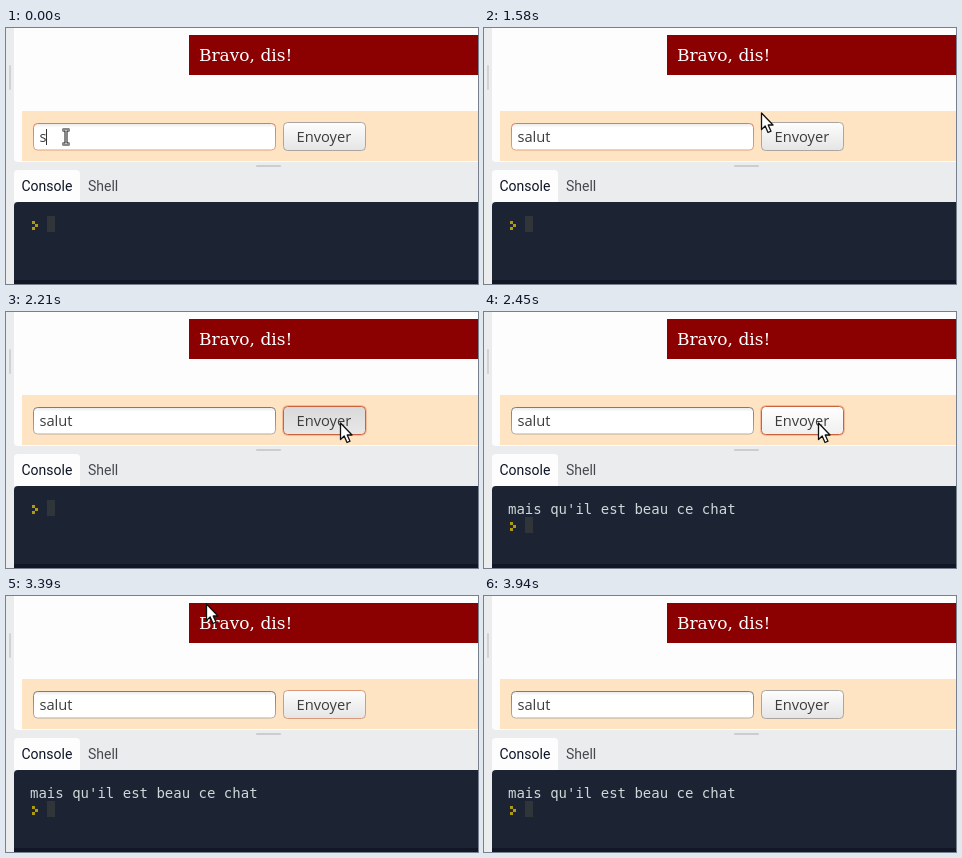
Animation, 472 px wide and 256 px high, one loop 4.12 s. Source, as an HTML page:

```html
<!DOCTYPE html>
<html lang="fr">
<head>
<meta charset="utf-8">
<title>Console</title>
<style>
html, body { margin: 0; width: 100%; height: 100%; overflow: hidden; background: #ebecee; }
svg { display: block; }
text { white-space: pre; }
.form { font: 14.7px "Open Sans", sans-serif; fill: #3c3c3c; }
.tab { font: 14px Roboto, sans-serif; }
</style>
</head>
<body>
<svg width="472" height="256" viewBox="0 0 472 256">
  <defs>
    <linearGradient id="normal" x2="0" y2="1"><stop stop-color="#fdfdfd"/><stop offset="1" stop-color="#e5e5e5"/></linearGradient>
    <linearGradient id="hover" x2="0" y2="1"><stop stop-color="#fff"/><stop offset="1" stop-color="#efefef"/></linearGradient>
    <linearGradient id="pressed" x2="0" y2="1"><stop stop-color="#d9d9d9"/><stop offset="1" stop-color="#e8e8e8"/></linearGradient>
    <linearGradient id="field" x2="0" y2="1"><stop stop-color="#e9e9e9"/><stop offset=".16" stop-color="#fff"/></linearGradient>
    <linearGradient id="grayEdge" x2="0" y2="1"><stop stop-color="#7f7b77"/><stop offset="1" stop-color="#b5aca3"/></linearGradient>
    <linearGradient id="orangeEdge" x2="0" y2="1"><stop stop-color="#d48059"/><stop offset="1" stop-color="#dfa17c"/></linearGradient>
  </defs>

  <rect width="472" height="256" fill="#ebecee"/>
  <rect x="3" y="37" width="2" height="25" rx="1" fill="#d0d2d5"/>
  <path d="M8 0H472V134H12Q8 134 8 130Z" fill="#fdfdfd"/>
  <rect x="183" y="7" width="289" height="40" fill="#8b0000"/>
  <text x="193" y="33" fill="#fff" style="font:17px 'DejaVu Serif',serif">Bravo, dis!</text>
  <rect x="16" y="83" width="456" height="50" fill="#ffe4c4"/>

  <rect id="input" x="27.5" y="95.5" width="242" height="26.5" rx="4" fill="url(#field)"/>
  <text id="typed" class="form" x="33.4" y="114"></text>
  <rect id="caret" y="101" width="1" height="16" fill="#333"/>
  <rect id="glow" x="276.5" y="93.5" width="84" height="30" rx="5" fill="none" stroke="#ef9a72" stroke-opacity=".55"/>
  <rect id="button" x="277.5" y="94.5" width="82" height="28" rx="4"/>
  <text class="form" x="290.5" y="114">Envoyer</text>

  <rect x="250" y="137" width="25" height="2" rx="1" fill="#cbcdd0"/>
  <path d="M8 174V146Q8 142 12 142H70Q74 142 74 146V174Z" fill="#fdfdfd"/>
  <text class="tab" x="15.5" y="163" fill="#0e1525">Console</text>
  <text class="tab" x="82" y="163" fill="#45494f">Shell</text>
  <path d="M8 256V178Q8 174 12 174H472V256Z" fill="#1c2333"/>
  <rect x="8" y="252" width="464" height="4" fill="#111726"/>
  <text id="output" x="24" y="202" fill="#cfd7d9" style="font:14px 'DejaVu Sans Mono',monospace">mais qu'il est beau ce chat</text>
  <g id="prompt">
    <path d="M26 193h3v3h3v3h-3v3h-3v-3h3v-3h-3z" fill="#b09a10"/>
    <rect x="41" y="188" width="8" height="16" fill="#303539"/>
  </g>

  <g id="ibeam" fill="none">
    <path d="M-3.5 -7H3.5M-3.5 7H3.5M0 -7V7" stroke="#111" stroke-width="3"/>
    <path d="M-3 -7H3M-3 7H3M0 -7V7" stroke="#fff"/>
  </g>
  <path id="arrow" d="M.5 0V16.5L4.2 13L7 19.5L10 18.2L7.2 12H12Z" fill="#fff" stroke="#111" stroke-width="1.3" stroke-linejoin="round"/>
</svg>
<script>
const LOOP = 4120, STEP = 30;
const PRESS = 2210, RELEASE = 2390, PRINT = 2450, LEAVE = 3180, BLUR = 3940;
const keystrokes = [0, 300, 480, 610, 730];
// time, x, y of the pointer
const path = [
  [0, 60, 109], [1449, 60, 109], [1450, 66, 107], [1480, 110, 102], [1510, 175, 94],
  [1540, 235, 87], [1570, 277, 85], [1640, 302, 87], [1750, 318, 94], [1960, 333, 104],
  [2050, 334, 111], [LEAVE - 1, 334, 111], [LEAVE, 328, 104], [3270, 280, 68],
  [3330, 242, 37], [3390, 200, 8], [3450, 160, -5], [3540, 115, -11],
  [3700, 67, -16], [3760, 67, -24], [LOOP, 67, -24]
];
const el = Object.fromEntries([...document.querySelectorAll('svg > [id]')].map(e => [e.id, e]));
const set = (e, attrs) => { for (const k in attrs) e.setAttribute(k, attrs[k]); };
const show = (e, on) => set(e, { visibility: on ? 'visible' : 'hidden' });
const inside = ([x, y], left, top, right, bottom) => x >= left && x <= right && y >= top && y <= bottom;

function pointerAt(t) {
  const start = t < LEAVE ? 1450 : LEAVE;
  if (t >= start) t = start + Math.floor((t - start) / STEP) * STEP;
  const i = path.findIndex(p => p[0] > t);
  const [t0, x0, y0] = path[i - 1], [t1, x1, y1] = path[i];
  const k = (t - t0) / (t1 - t0);
  return [Math.round(x0 + (x1 - x0) * k), Math.round(y0 + (y1 - y0) * k)];
}

function draw(t) {
  const pos = pointerAt(t);
  const overField = inside(pos, 27, 95, 270, 122);
  const overButton = inside(pos, 277, 94, 360, 123);
  const focused = t >= PRESS && t < BLUR;
  const pressed = t >= PRESS && t < RELEASE;

  el.typed.textContent = 'salut'.slice(0, keystrokes.filter(k => k <= t).length);
  set(el.caret, { x: Math.floor(33.4 + el.typed.getComputedTextLength()) });
  show(el.caret, t < 300 || (t >= 480 && t < 1450));
  set(el.input, { stroke: `url(#${t < PRESS ? 'orangeEdge' : 'grayEdge'})` });

  set(el.button, {
    fill: `url(#${pressed ? 'pressed' : overButton ? 'hover' : 'normal'})`,
    stroke: !focused ? '#aaa5a0' : overButton ? '#c9633d' : '#d9987a'
  });
  show(el.glow, focused && overButton);

  show(el.output, t >= PRINT);
  set(el.prompt, { transform: `translate(0 ${t >= PRINT ? 17 : 0})` });

  for (const pointer of [el.ibeam, el.arrow]) set(pointer, { transform: `translate(${pos})` });
  show(el.ibeam, overField);
  show(el.arrow, !overField);
}

const origin = performance.now();
function tick() {
  draw((performance.now() - origin) % LOOP);
  requestAnimationFrame(tick);
}
tick();
</script>
</body>
</html>
```
